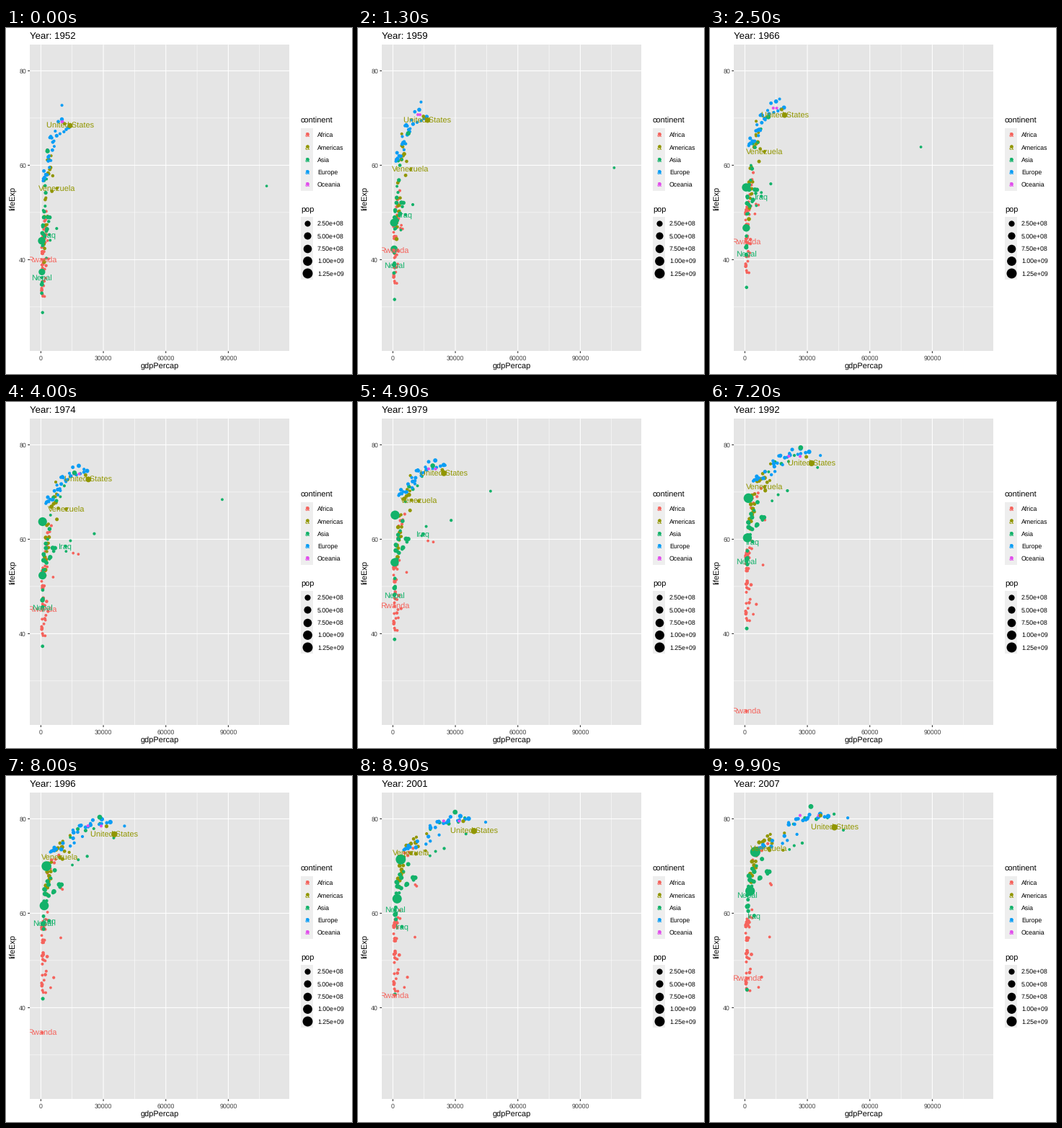
Animation of 480 by 480 pixels, one loop 10000 ms. Source, as a matplotlib script:

```python
import numpy as np
import matplotlib.pyplot as plt
from matplotlib.animation import FuncAnimation
from matplotlib.patches import Rectangle

FRAMES, STEP = 100, 100
SIZE, DPI = 480, 72
LEFT, TOP, RIGHT, BOTTOM = 33, 23.2, 393, 448.3
COLORS = {"Africa": "#f5635c", "Americas": "#919600", "Asia": "#13b26a",
          "Europe": "#0a9df5", "Oceania": "#e14dec"}
MAX_POP = 1319

plt.rcParams["font.family"] = "Liberation Sans"
plt.rcParams["text.hinting"] = "no_hinting"
rng = np.random.default_rng(12)
t = np.linspace(0, 1, FRAMES)
years = 1952 + 55 * t


def px(gdp):
    return 48.4 + 2.889 * np.asarray(gdp)


def py(life):
    return 583.4 - 6.55 * np.asarray(life)


def diameter(pop):
    size = 1 + 5 * np.sqrt(np.asarray(pop) / MAX_POP)
    return 0.75 * (2.845 * size + 0.945) + 0.7


gdps, lives, pops, hues, labels = [], [], [], [], []


def add(cont, pop, gdp, life):
    gdps.append(gdp)
    lives.append(life)
    pops.append(pop)
    hues.append(COLORS[cont])


def between(bounds, rank):
    """Point at a rank between two bounds, on a logarithmic scale."""
    lo, hi = bounds
    return lo * (hi / lo) ** rank


def crowd(cont, n, pop, gdp, gdp_end, life, life_end, link=0.6, ease=1.4, oil=0):
    """n countries between (low, high) bounds that drift to end bounds.
    link: how closely life follows income; oil: height of a 1970s boom."""
    boom = oil * np.exp(-((years - 1977) / 7) ** 2)
    for rank in (np.arange(n) + 0.5) / n:
        last = np.clip(rank + rng.normal(0, 0.08), 0, 1)
        health = link * rank + (1 - link) * rng.random()
        g0, g1 = between(gdp, rank), between(gdp_end, last)
        l0, l1 = np.interp(health, (0, 1), life), np.interp(health, (0, 1), life_end)
        people = between(pop, rng.random()) * (1 + t)
        add(cont, people,
            g0 * (g1 / g0) ** t ** 0.85 + boom * rng.uniform(0.3, 1),
            l0 + (l1 - l0) * (1 - (1 - t) ** ease))


def path(cont, pop, *points, label=None):
    """One country led through (year, gdp in thousands, life) points."""
    if label:
        labels.append((label, len(gdps), COLORS[cont]))
    when, gdp, life = zip(*points)
    add(cont, np.interp(t, (0, 1), pop),
        np.interp(years, when, gdp), np.interp(years, when, life))


crowd("Africa", 39, (.4, 22), (.3, 2.7), (.35, 3.5), (30, 47), (41, 61), link=.15, ease=2)
crowd("Africa", 7, (.5, 20), (1.2, 2.7), (3.8, 11), (42, 53), (71, 76))
crowd("Africa", 3, (.3, 10), (.6, 4.5), (5, 13), (37, 45), (40, 57), ease=2.5)
crowd("Africa", 2, (.4, 1), (2.4, 4.3), (12, 13), (37, 43), (57, 74), ease=2, oil=14)
crowd("Americas", 20, (2, 40), (1.4, 5.9), (2.6, 13), (38, 66), (66, 78.5))
crowd("Americas", 2, (.7, 3), (3, 3.1), (18, 19.3), (59, 64.3), (69.8, 78.7), ease=2)
crowd("Asia", 20, (3, 75), (.4, 4.5), (1, 12), (32, 59), (60, 74), ease=1.2)
crowd("Asia", 5, (1, 20), (1, 4.1), (23, 47), (48, 66), (78.4, 82))
crowd("Asia", 3, (.2, 4), (2, 9.9), (20, 29), (38, 50), (73, 75.6), oil=14)
crowd("Europe", 13, (2, 25), (1, 6.9), (5.9, 25), (53, 67), (72, 78), ease=2)
crowd("Europe", 16, (2, 50), (3.1, 14), (21, 40), (60, 72.5), (78.3, 81.8))
crowd("Oceania", 2, (2, 9), (9.9, 10.7), (23, 38), (69, 69.4), (80, 81.4), ease=1)

path("Europe", (3, 5), (1952, 10.1, 72.7), (1974, 20.5, 74.8), (2007, 49.4, 80.2))
path("Americas", (15, 33), (1952, 11.4, 68.8), (2007, 36.3, 80.7))
path("Asia", (8, 32), (1952, .8, 28.8), (1977, .8, 38.4), (2007, 1, 43.8))
path("Asia", (86, 127), (1952, 3.2, 63), (1972, 14.8, 73.4),
     (1992, 26.8, 79.4), (2007, 31.7, 82.6))
path("Asia", (.2, 2.5), (1952, 108.4, 55.6), (1957, 113.5, 58), (1967, 80.9, 64.6),
     (1972, 109.3, 67.7), (1977, 59.3, 69.3), (1982, 31.4, 71.3), (1987, 28.1, 74.2),
     (1992, 34.9, 75.2), (2002, 35.1, 76.9), (2007, 47.3, 77.6))
path("Asia", (556, 1319), (1952, .4, 44), (1957, .6, 50.5), (1962, .5, 44.5),
     (1967, .6, 58.4), (1972, .7, 63.1), (1992, 1.7, 68.7), (2007, 5, 73))
path("Asia", (372, 1110), (1952, .5, 37.4), (1977, .8, 54.2), (1992, 1.2, 60.3), (2007, 2.5, 64.7))

path("Africa", (2.5, 9), (1952, .5, 40), (1967, .5, 44.1), (1982, .9, 46.2), (1987, .8, 44),
     (1992, .7, 23.6), (1997, .6, 36.1), (2002, .8, 43.4), (2007, .9, 46.2), label="Rwanda")
path("Asia", (5, 27), (1952, 4.1, 45.3), (1972, 9.6, 57), (1977, 14.7, 60.4), (1982, 14.5, 62),
     (1987, 11.6, 65), (1992, 3.7, 59.5), (2002, 4.4, 57), (2007, 4.5, 59.5), label="Iraq")
path("Asia", (9, 29), (1952, .5, 36.2), (1967, .7, 41.5), (1982, .7, 49.6),
     (2007, 1.1, 63.8), label="Nepal")
path("Americas", (157, 301), (1952, 14, 68.4), (1967, 19.5, 70.8), (1977, 24.1, 73.4),
     (1982, 25, 74.7), (1992, 32, 76.1), (2007, 43, 78.2), label="United States")
path("Americas", (5, 26), (1952, 7.7, 55.1), (1967, 9.5, 63.5), (1977, 13.1, 67.5),
     (1987, 9.9, 70.2), (2002, 8.6, 72.8), (2007, 11.4, 73.7), label="Venezuela")

xs, ys = px(gdps), py(lives)
areas = diameter(pops) ** 2

fig = plt.figure(figsize=(SIZE / DPI, SIZE / DPI), dpi=DPI, facecolor="white")
ax = fig.add_axes([0, 0, 1, 1])
ax.set(xlim=(0, SIZE), ylim=(SIZE, 0))
ax.axis("off")


def box(x, y, w, h, color):
    return ax.add_patch(Rectangle((x, y), w, h, fc=color, lw=0, zorder=0))


def line(x, y, color, width):
    ax.plot(x, y, color=color, lw=width, solid_capstyle="butt", snap=False, zorder=1)


def write(x, y, text, size, color="black", **kw):
    return ax.text(x, y, text, fontsize=size, color=color, **kw)


panel = box(LEFT, TOP, RIGHT - LEFT, BOTTOM - TOP, "#e5e5e5")
for k in range(15, 106, 30):
    line([px(k)] * 2, [TOP, BOTTOM], "white", 0.55)
for v in (30, 50, 70):
    line([LEFT, RIGHT], [py(v)] * 2, "white", 0.55)
for k in range(0, 91, 30):
    line([px(k)] * 2, [TOP, BOTTOM], "white", 1.07)
    line([px(k)] * 2, [BOTTOM, BOTTOM + 2.75], "#2b2b2b", 1.07)
    write(px(k), 460.5, str(k * 1000), 8.8, "#404040", ha="center")
for v in (40, 60, 80):
    line([LEFT, RIGHT], [py(v)] * 2, "white", 1.07)
    line([LEFT - 2.75, LEFT], [py(v)] * 2, "#2b2b2b", 1.07)
    write(28, py(v) + 3.2, str(v), 8.8, "#404040", ha="right")
write(213, 472.5, "gdpPercap", 11, ha="center")
write(10, 236, "lifeExp", 11, ha="center", va="center", rotation=90)

KEY = 17.28
write(409, 132, "continent", 11)
for i, (name, color) in enumerate(COLORS.items()):
    y = 148 + i * KEY
    box(409, y - KEY / 2, KEY, KEY, "#eeeeee")
    ax.scatter(417.7, y - 0.8, s=4.6 ** 2, c=color, lw=0)
    write(417.7, y + 4.2, "a", 11, color, ha="center")
    write(432, y + 3.2, name, 8.8)
write(409, 256, "pop", 11)
for i in range(5):
    y, pop = 271.1 + i * KEY, 250 * (i + 1)
    box(409, y - KEY / 2, KEY, KEY, "#eeeeee")
    ax.scatter(417.7, y, s=diameter(pop) ** 2, c="black", lw=0)
    write(432, y + 3.2, f"{pop * 1e6:.2e}", 8.8)

title = write(33, 15, "", 13.2)
dots = ax.scatter(xs[:, 0], ys[:, 0], s=areas[:, 0], c=hues, lw=0, zorder=3)
dots.set_clip_path(panel)
tags = []
for text, index, color in labels:
    tag = write(0, 0, text, 11, color, ha="center", zorder=4, clip_on=True)
    tag.set_clip_path(panel)
    tags.append((tag, index))


def draw(i):
    title.set_text(f"Year: {years[i]:.0f}")
    dots.set_offsets(np.column_stack([xs[:, i], ys[:, i]]))
    dots.set_sizes(areas[:, i])
    for tag, index in tags:
        tag.set_position((xs[index, i], ys[index, i] + 4))
    return [title, dots] + [tag for tag, _ in tags]


anim = FuncAnimation(fig, draw, frames=FRAMES, interval=STEP, repeat=True, repeat_delay=0)
plt.show()
```
